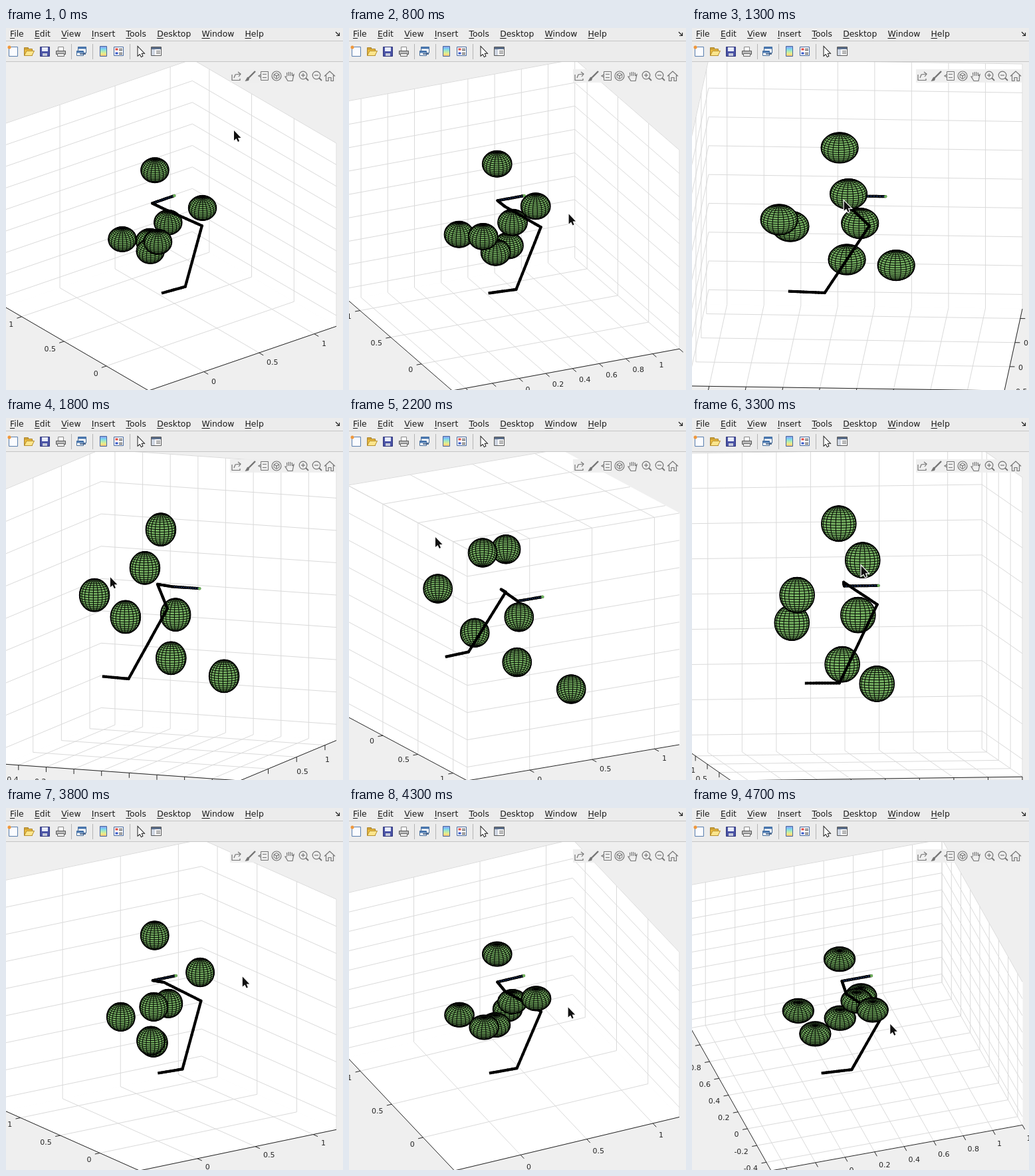
Recreate the animation shown at these times as an HTML page with a canvas. Size 507x544 px, loop 4800 ms.

```html
<!DOCTYPE html>
<html lang="en">
<head>
<meta charset="utf-8">
<title>Robot arm, rotating 3D view</title>
<style>
  html, body { margin: 0; width: 100%; height: 100%; overflow: hidden; background: #efefef; }
  canvas { display: block; }
</style>
</head>
<body>
<canvas id="stage" width="507" height="544"></canvas>
<script>
const ctx = document.getElementById('stage').getContext('2d');
const LOOP = 4800, STEP = 100, RAD = Math.PI / 180;
const LEFT = -2, RIGHT = 497, TOP = 47, BOTTOM = 545;
const MIN = -0.5, MAX = 1.2, MID = (MIN + MAX) / 2, SPAN = MAX - MIN;
const INK = '#262626', FONT = 'px "DejaVu Sans", sans-serif';
const RADIUS = 0.1, FACES = 20;

// Turning points of the drag: time, azimuth, elevation
const TURNS = [
  [0, -37.5, 30], [400, -37.5, 30], [1300, 3.27, 18.5], [1800, 22.3, 9],
  [2600, 28.6, -36.2], [3300, -7.9, 5.4], [3800, -34.4, 17.5], [4700, -17.75, 46.3]
];
const BALLS = [
  [0.255, 0.411, 0.864], [0.537, 0.838, -0.089], [0.289, 0.508, 0.056], [0.366, 0.4, 0.345],
  [0.33, -0.053, 0.699], [-0.048, -0.02, 0.503], [-0.014, 0.445, 0.302]
];
// Links of the arm: length, heading, pitch
const ARM = chain([[0.2, -6, 0], [0.505, 25, 59], [0.3, 126, 21], [0.19, 81, -12], [0.2, 0, 0]]);

function chain(links) {
  const pts = [[0, 0, 0]];
  for (const [len, heading, pitch] of links) {
    const [x, y, z] = pts[pts.length - 1];
    const flat = len * Math.cos(pitch * RAD);
    pts.push([x + flat * Math.cos(heading * RAD), y + flat * Math.sin(heading * RAD), z + len * Math.sin(pitch * RAD)]);
  }
  return pts;
}

// ---- motion ----
const mix = (a, b, s) => a.map((v, k) => v + (b[k] - v) * s);
const smooth = s => s * s * (3 - 2 * s);

function slope(i, c) {
  const a = TURNS[i - 1], b = TURNS[i], d = TURNS[i + 1];
  return !a || !d || a[c] === b[c] ? 0 : (d[c] - a[c]) / (d[0] - a[0]);
}

function angle(t, c) {
  let i = 0;
  while (i < TURNS.length - 2 && t > TURNS[i + 1][0]) i++;
  const a = TURNS[i], b = TURNS[i + 1], d = b[0] - a[0], s = (t - a[0]) / d, r = 1 - s;
  return a[c] + (b[c] - a[c]) * smooth(s) + d * s * r * (r * slope(i, c) - s * slope(i + 1, c));
}

// The pointer comes down to the plot, then drags the view slightly late.
function pointer(t) {
  const seen = Math.max(0, t - 40);
  const held = [234 - 3.6 * angle(seen, 1), 214 + 2.4 * angle(seen, 2)];
  return mix([343, 154], held, smooth(Math.min(1, t / 300)));
}

// Orthographic camera stretched so the box fills the axes rectangle.
function makeView(azDeg, elDeg) {
  const az = azDeg * RAD, el = elDeg * RAD;
  const c = Math.cos(az), s = Math.sin(az), ce = Math.cos(el), se = Math.sin(el);
  const wide = Math.abs(c) + Math.abs(s);
  const kx = (RIGHT - LEFT) / (SPAN * wide);
  const ky = (BOTTOM - TOP) / (SPAN * (Math.abs(se) * wide + ce));
  const cx = (LEFT + RIGHT) / 2, cy = (TOP + BOTTOM) / 2;
  return {
    s, se, kx, ky, elDeg,
    point([x, y, z]) {
      x -= MID; y -= MID; z -= MID;
      return [cx + kx * (c * x + s * y), cy - ky * (se * (c * y - s * x) + ce * z)];
    },
    depth: ([x, y, z]) => ce * (s * x - c * y) + se * z
  };
}

// ---- drawing helpers ----
function paint(fill, stroke, width = 1) {
  if (fill) { ctx.fillStyle = fill; ctx.fill(); }
  if (stroke) { ctx.strokeStyle = stroke; ctx.lineWidth = width; ctx.stroke(); }
}
function line(color, width, ...pts) {
  ctx.beginPath();
  pts.forEach(p => ctx.lineTo(...p));
  paint(null, color, width);
}
function shape(fill, stroke, ...pts) {
  ctx.beginPath();
  pts.forEach(p => ctx.lineTo(...p));
  ctx.closePath();
  paint(fill, stroke);
}
function rect(x, y, w, h, fill, stroke) {
  ctx.beginPath();
  ctx.rect(x, y, w, h);
  paint(fill, stroke);
}
function oval(x, y, rx, ry, fill, stroke, width) {
  ctx.beginPath();
  ctx.ellipse(x, y, rx, ry, 0, 0, 7);
  paint(fill, stroke, width);
}
function placed(x, y, draw) {
  ctx.save();
  ctx.translate(x, y);
  draw();
  ctx.restore();
}

// ---- axes ----
const at = (axis, v, base) => { const p = base.slice(); p[axis] = v; return p; };

function ticksFor(view, axis) {
  const a = view.point([0, 0, 0]), b = view.point(at(axis, 0.2, [0, 0, 0]));
  const fine = axis === 2 || Math.abs(b[0] - a[0]) >= 40 || Math.abs(b[1] - a[1]) >= 20;
  const step = fine ? 0.2 : 0.5, out = [];
  for (let i = Math.ceil(MIN / step); i * step <= MAX + 1e-6; i++) out.push(Math.round(i * step * 10) / 10);
  return out;
}

function drawWalls(view, ticks) {
  const back = [view.s < 0 ? MAX : MIN, MAX, view.se > 0 ? MIN : MAX];
  const pairs = [[0, 1], [0, 2], [1, 2]];
  for (const [i, j] of pairs) {
    const spot = (p, q) => view.point(at(j, q, at(i, p, back)));
    shape('#fff', '#fff', spot(MIN, MIN), spot(MAX, MIN), spot(MAX, MAX), spot(MIN, MAX));
  }
  for (const [i, j] of pairs) {
    for (const [m, n] of [[i, j], [j, i]]) {
      for (const v of ticks[m]) {
        const p = at(m, v, back);
        line('#dadada', 1, view.point(at(n, MIN, p)), view.point(at(n, MAX, p)));
      }
    }
  }
}

function drawRuler(view, axis, ticks, base, sign) {
  line(INK, 1, view.point(at(axis, MIN, base)), view.point(at(axis, MAX, base)));
  const other = 1 - axis;
  ctx.font = 11 + FONT;
  for (const v of ticks) {
    const p = at(axis, v, base), [x, y] = view.point(p);
    const q = view.point(at(other, p[other] + sign, p));
    const len = Math.hypot(q[0] - x, q[1] - y), leftward = q[0] < x;
    const low = Math.abs(view.elDeg) < 12;
    const dx = low ? 0 : (q[0] - x) / len, dy = low ? 1 : (q[1] - y) / len;
    line(INK, 1, [x, y], [x + dx * 7.5, y + dy * 7.5]);
    ctx.textAlign = leftward ? 'right' : 'left';
    ctx.fillStyle = INK;
    ctx.fillText(v, x + dx * 13, y + 4 + 15 * dy + 6.5 * Math.max(0, Math.min(1, dy * 5)));
  }
}

function drawAxes(view) {
  const ticks = [0, 1, 2].map(i => ticksFor(view, i));
  const above = view.se > 0, right = (view.s > 0) === above;
  drawWalls(view, ticks);
  drawRuler(view, 0, ticks[0], [0, above ? MIN : MAX, MIN], above ? -1 : 1);
  drawRuler(view, 1, ticks[1], [right ? MAX : MIN, 0, MIN], right ? 1 : -1);
}

// ---- balls and arm ----
function ballPoint(o, i, j) {
  const lat = (j / FACES - 0.5) * Math.PI, lon = i / FACES * 2 * Math.PI;
  const r = RADIUS * Math.cos(lat);
  return [o[0] + r * Math.cos(lon), o[1] + r * Math.sin(lon), o[2] + RADIUS * Math.sin(lat)];
}

function drawBall(view, o) {
  const limit = view.depth(o) - 0.01, [x, y] = view.point(o);
  const rx = RADIUS * view.kx, ry = RADIUS * view.ky;
  oval(x, y, rx, ry, '#78b564');
  ctx.beginPath();
  const edge = (a, b) => {
    if (Math.min(view.depth(a), view.depth(b)) < limit) return;
    ctx.moveTo(...view.point(a));
    ctx.lineTo(...view.point(b));
  };
  for (let i = 0; i < FACES; i++) {
    for (let j = 0; j < FACES; j++) {
      const p = ballPoint(o, i, j);
      edge(p, ballPoint(o, i + 1, j));
      edge(p, ballPoint(o, i, j + 1));
    }
  }
  paint(null, '#000', 1);
  oval(x, y, rx, ry, null, '#000', 1.6);
}

function drawScene(view) {
  const items = BALLS.map(o => ({ z: view.depth(o), draw: () => drawBall(view, o) }));
  const parts = 12, last = ARM.length - 2, tip = ARM[last + 1];
  for (let k = 0; k <= last; k++) {
    for (let i = 0; i < parts; i++) {
      const a = mix(ARM[k], ARM[k + 1], i / parts);
      const b = mix(ARM[k], ARM[k + 1], (i + 1) / parts);
      items.push({ z: view.depth(mix(a, b, 0.5)), draw() {
        const p = view.point(a), q = view.point(b);
        ctx.lineCap = k + i === 0 ? 'butt' : 'round';
        line('#000', 4.2, p, q);
        if (k === last) line('#24427c', 1.3, p, q);
        ctx.lineCap = 'butt';
      } });
    }
  }
  items.push({ z: view.depth(tip) + 0.02, draw: () => oval(...view.point(tip), 2.2, 2.2, '#6fb35c') });
  items.sort((a, b) => a.z - b.z).forEach(it => it.draw());
}

// ---- window chrome, icons drawn around their own centre ----
function arrow(fill, edge, width) {
  ctx.beginPath();
  [[0, 0], [0, 15], [3.5, 12], [6, 17], [8, 16], [6, 11], [10.5, 11]].forEach(p => ctx.lineTo(...p));
  ctx.closePath();
  paint(null, edge, width);
  paint(fill);
}

function rows(x, w, ys, color) {
  for (const y of ys) line(color, 1, [x, y], [x + w, y]);
}

function frame(x, y, w, h) {
  rect(x, y, w, h, '#fff', '#3f6797');
  rect(x, y, w, 3, '#4b78b0');
}

const TOOLS = [
  [
    function fresh() {
      rect(-5.5, -6.5, 13, 14, '#fbfcff', '#5a7eae');
      oval(-5, -6, 2.5, 2.5, '#f0973a');
    },
    function open() {
      rect(-6.5, -5.5, 6, 3, '#e9b93c', '#a9812a');
      rect(-6.5, -3.5, 12, 10, '#e9b93c', '#a9812a');
      shape('#fbe58c', '#b78f2e', [-6.5, 6.5], [-3, -0.5], [8.5, -0.5], [5, 6.5]);
    },
    function save() {
      rect(-6.5, -6.5, 14, 14, '#4a53a5', '#30377c');
      rect(-4, -6, 9, 6, '#e8ecfa');
      rect(-3, 3, 7, 4, '#c7cbdc');
    },
    function print() {
      rect(-3.5, -6.5, 8, 8, '#fff', '#888');
      rect(-6.5, -0.5, 14, 5, '#b9b9b9', '#555');
      rect(-4.5, 3.5, 10, 4, '#eee', '#666');
    }
  ],
  [
    function link() {
      frame(-5.5, -6.5, 12, 9);
      frame(-7.5, -0.5, 10, 7);
      line('#2c4c78', 1.5, [-3, 4], [6, 4]);
    }
  ],
  [
    function colours() {
      const g = ctx.createLinearGradient(0, -7, 0, 8);
      ['#8a9df0', '#7cd8f0', '#b5ecb0', '#f7ea80', '#f0a47c'].forEach((c, i) => g.addColorStop(i / 4, c));
      rect(-4.5, -7.5, 10, 15, g, '#45679c');
    },
    function legend() {
      rect(-7.5, -6.5, 14, 13, '#fff', '#45679c');
      rect(-5.5, -4.5, 4, 3, '#e0453d');
      rect(-5.5, 1.5, 4, 3, '#3557c8');
      rows(0, 5, [-3.5, -1.5, 2.5, 4.5], '#444');
    }
  ],
  [
    () => placed(-3.5, -6.5, () => { ctx.scale(0.85, 0.85); arrow('#fff', '#111', 2.2); }),
    function inspect() {
      rect(-7.5, -6.5, 15, 13, '#fff', '#555');
      rect(-7, -6, 14, 3, '#5b6f8c');
      rect(-7, -3, 5, 9, '#cfd6e2');
      rows(0, 6, [-0.5, 1.5, 3.5], '#777');
    }
  ]
];

function drawChrome() {
  rect(0, 0, 507, 51, '#ececec');
  rows(0, 507, [19.5, 50.5], '#c6c6c6');
  ctx.font = 12.4 + FONT;
  ctx.textAlign = 'left';
  let x = 6;
  for (const word of ['File', 'Edit', 'View', 'Insert', 'Tools', 'Desktop', 'Window', 'Help']) {
    ctx.fillStyle = '#1a1a1a';
    ctx.fillText(word, x, 13);
    rows(x, ctx.measureText(word[0]).width, [15.5], '#1a1a1a');
    x += ctx.measureText(word).width + 16.2;
  }
  line('#222', 1.2, [496, 6], [501, 11]);
  line('#222', 1.2, [501.5, 7], [501.5, 11.5], [497, 11.5]);

  x = 10;
  TOOLS.forEach((group, i) => {
    if (i) {
      x += 8;
      line('#b4b4b4', 1, [x - 15.5, 24], [x - 15.5, 47]);
    }
    for (const icon of group) {
      placed(x, 35, icon);
      x += 24;
    }
  });
}

const GREY = '#747474';
const ln = (...p) => line(GREY, 1.2, ...p);
const ring = (y, r) => oval(0, y, r, r, null, GREY, 1.2);
function lens() {
  ring(-1, 5.8);
  line(GREY, 1.8, [4, 3], [8, 7]);
  ln([-3, -1], [3, -1]);
}

const AXES_TOOLS = [
  function share() {
    ln([-7, -2], [-7, 6.5], [5, 6.5], [5, 4]);
    ln([-4, 3], [-2, -2], [6, -3]);
    ln([2, -6], [6, -3], [3, 1]);
  },
  function brush() {
    line(GREY, 2.4, [8, -7], [-1, 2]);
    shape(GREY, null, [0, 1], [-2, 7], [-7.5, 8], [-4, 2]);
  },
  function tip() {
    rect(-3.5, -6.5, 11, 13, null, GREY);
    ln([-3.5, -2], [-7, 0], [-3.5, 2]);
    rows(-1, 6, [-2.5, 2.5], GREY);
  },
  function rotate() {
    ring(0, 7);
    const spoke = i => [4.5 * Math.sin(i * 60 * RAD), 4.5 * Math.cos(i * 60 * RAD)];
    shape(null, GREY, ...[0, 1, 2, 3, 4, 5].map(spoke));
    for (const i of [0, 2, 4]) ln([0, 0], spoke(i));
  },
  function pan() {
    for (let i = 0; i < 4; i++) ln([i * 2.6 - 4, 0], [i * 2.6 - 4.5, -6.5 + Math.abs(i - 1.5)]);
    ln([-4, 1], [-7, 1], [-3, 7.5], [4, 7.5], [6, -2], [3.8, 0]);
  },
  function zoomIn() { lens(); ln([0, -4], [0, 2]); },
  lens,
  function home() {
    ln([-8, 0.5], [0, -7], [8, 0.5]);
    ln([-5.5, -1], [-5.5, 7.5], [-2, 7.5], [-2, 2.5], [2, 2.5], [2, 7.5], [5.5, 7.5], [5.5, -1]);
  }
];

function draw(t) {
  const view = makeView(angle(t, 1), angle(t, 2));
  rect(0, 0, 507, 544, '#efefef');
  drawAxes(view);
  drawScene(view);
  rect(337, 62, 160, 20, 'rgba(238,238,238,0.92)');
  AXES_TOOLS.forEach((icon, i) => placed(347 + 20 * i, 72, icon));
  drawChrome();
  placed(...pointer(t), () => arrow('#111', '#fff', 2.4));
}

const start = performance.now();
let shown = -1;
function tick() {
  const t = Math.floor(((performance.now() - start) % LOOP) / STEP) * STEP;
  if (t !== shown) draw(shown = t);
  requestAnimationFrame(tick);
}
tick();
</script>
</body>
</html>
```
